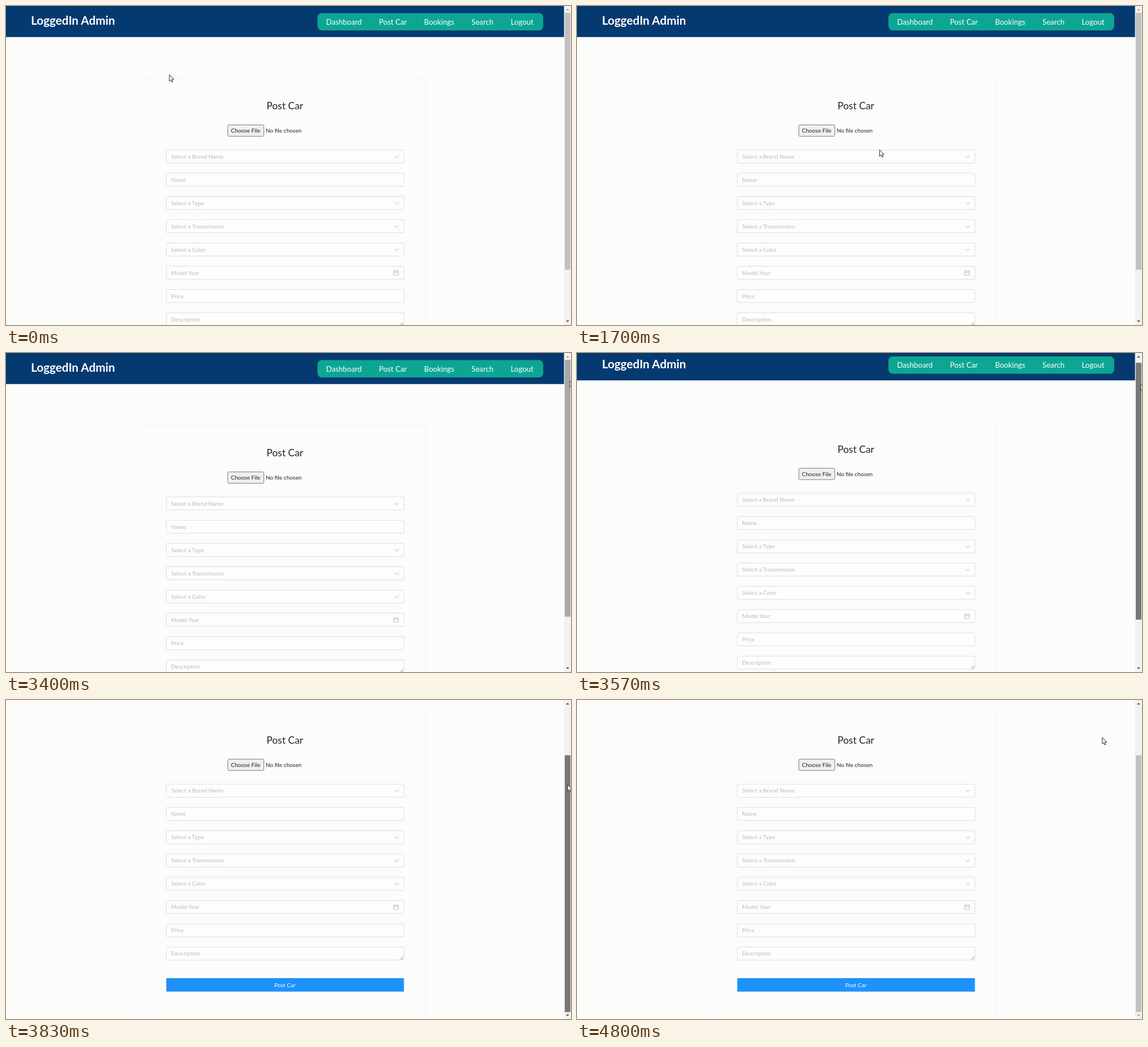
An HTML page for the animation above (4.86 s loop, 996 by 562 pixels).

```html
<!DOCTYPE html>
<html lang="en">
<head>
<meta charset="utf-8">
<title>Post Car</title>
<style>
  html, body { margin: 0; width: 100%; height: 100%; overflow: hidden; background: #fcfdfb; }
  svg { display: block; width: 996px; height: 562px; }
  text { font-family: Lato, sans-serif; font-size: 10.1px; fill: #222; }
  .brand { font-size: 20.65px; font-weight: 700; fill: #fff; }
  .nav { font-size: 13.2px; fill: #fff; }
  .title { font-size: 17.4px; text-anchor: middle; }
  .submit { fill: #fff; text-anchor: middle; }
  .hint { fill: #bbbbb8; }
  .field { fill: #fdfdfc; stroke: #dedee1; }
  .icon { fill: none; stroke: #b9b9b9; }
  .grip { fill: none; stroke: #777; stroke-width: .8; }
</style>
</head>
<body>
<svg viewBox="0 0 996 562">
  <defs>
    <filter id="soft" x="-5%" y="-5%" width="110%" height="110%"><feGaussianBlur stdDeviation="1.5"/></filter>
  </defs>
  <rect width="996" height="562" fill="#fcfdfb"/>
  <g id="page">
    <rect width="984" height="54.7" fill="#053a71"/>
    <text class="brand" x="44" y="33.2">LoggedIn Admin</text>
    <rect x="549" y="12.5" width="398" height="30.5" rx="7.5" fill="#0ca693"/>
    <g id="nav"></g>
    <rect x="243" y="126.5" width="497" height="560" rx="4" fill="none" stroke="#f8f8f8" stroke-width="4" filter="url(#soft)"/>
    <text class="title" x="491.6" y="182">Post Car</text>
    <rect x="391" y="209.5" width="63.5" height="20" rx="2" fill="#efefef" stroke="#7c7c7c"/>
    <text x="396.5" y="223.2">Choose File</text>
    <text x="457.7" y="223.2">No file chosen</text>
    <g id="form"></g>
    <rect x="282.5" y="595.3" width="419" height="23.7" rx="1.5" fill="#1f92fa"/>
    <text class="submit" x="491.7" y="611">Post Car</text>
  </g>
  <rect x="983.7" width="12.3" height="562" fill="#f2f2f2"/>
  <rect id="thumb" x="985" y="12" width="10" height="452.5"/>
  <path id="up" d="M987 8l3-3 3 3z"/>
  <path id="down" d="M987 554l3 3 3-3z"/>
  <path id="cursor" d="M0 0V11.4L2.6 9 4.3 13 6.2 12.2 4.5 8.3H7.8Z" fill="#fff" stroke="#111" stroke-width=".9"/>
</svg>
<script>
const LOOP = 4860, FPS = 30;
const $ = id => document.getElementById(id);

// nav links sit in a row with an even gap, measured from their own text
let navX = 564.3;
for (const label of ['Dashboard', 'Post Car', 'Bookings', 'Search', 'Logout']) {
  $('nav').insertAdjacentHTML('beforeend', `<text class="nav" x="${navX}" y="32.8">${label}</text>`);
  navX += $('nav').lastElementChild.getComputedTextLength() + 30.4;
}

const icons = {
  select: '<path class="icon" d="M685.2 10l3.6 4.2 3.6-4.2"/>',
  date: '<path class="icon" stroke-width=".9" d="M683.2 8.3h8.6v7.4h-8.6zM683.2 10.9h8.6M685.5 7v2.4M689.5 7v2.4"/>',
  area: '<path class="grip" d="M694.5 22l5.5-5.5M697.5 22l2.5-2.5"/>'
};
const fields = [
  ['Select a Brand Name', 'select'], ['Name'], ['Select a Type', 'select'],
  ['Select a Transmission', 'select'], ['Select a Color', 'select'],
  ['Model Year', 'date'], ['Price'], ['Description', 'area']
];
$('form').innerHTML = fields.map(([label, kind], i) =>
  `<g transform="translate(0 ${253.5 + 41 * i})">
    <rect class="field" x="282.5" width="419" height="23" rx="1.5"/>
    <text class="hint" x="291" y="15.2">${label}</text>${icons[kind] || ''}</g>`).join('');

const part = (t, from, to) => Math.min(1, Math.max(0, (t - from) / (to - from)));
const ease = (t, from, to) => { const k = part(t, from, to); return k * k * (3 - 2 * k); };

// the drag starts slowly and then runs to the end of the page
const scrollAt = t => 6.5 * part(t, 3467, 3567) + 14.5 * part(t, 3567, 3700) + 84.3 * part(t, 3700, 3833);

// nudge, dip across the form, move to the scrollbar, drag, leave
function pointerAt(t, scroll) {
  const nudge = ease(t, 100, 400), cross = ease(t, 1100, 2450), reach = ease(t, 2680, 3250);
  const drag = ease(t, 3567, 3833), leave = ease(t, 4380, 4790);
  const dip = Math.sin(Math.PI * part(t, 1100, 2450) ** .68) ** 2;
  return [
    288 + 9 * nudge + 567 * cross + 130 * reach - 4 * drag - 64 * leave,
    121 + 4 * nudge + 7 * cross + 133 * dip - 83 * reach + .95 * scroll - 83 * leave
  ];
}

function draw(ms) {
  const t = Math.floor((ms + 8) * FPS / 1000) * 1000 / FPS;
  const scroll = scrollAt(t), [x, y] = pointerAt(t, scroll);
  const held = t >= 3450 && t < 4370;
  $('page').setAttribute('transform', `translate(0 ${-scroll})`);
  $('cursor').setAttribute('transform', `translate(${x} ${y})`);
  $('thumb').setAttribute('y', 12 + scroll * .81);
  $('thumb').setAttribute('fill', held ? '#787878' : x >= 984 ? '#a8a8a8' : '#c1c1c1');
  $('up').setAttribute('fill', scroll > 0 ? '#505050' : '#a3a3a3');
  $('down').setAttribute('fill', t > 3900 ? '#a3a3a3' : '#505050');
}

const start = performance.now();
function tick() {
  draw((performance.now() - start) % LOOP);
  requestAnimationFrame(tick);
}
tick();
</script>
</body>
</html>
```
